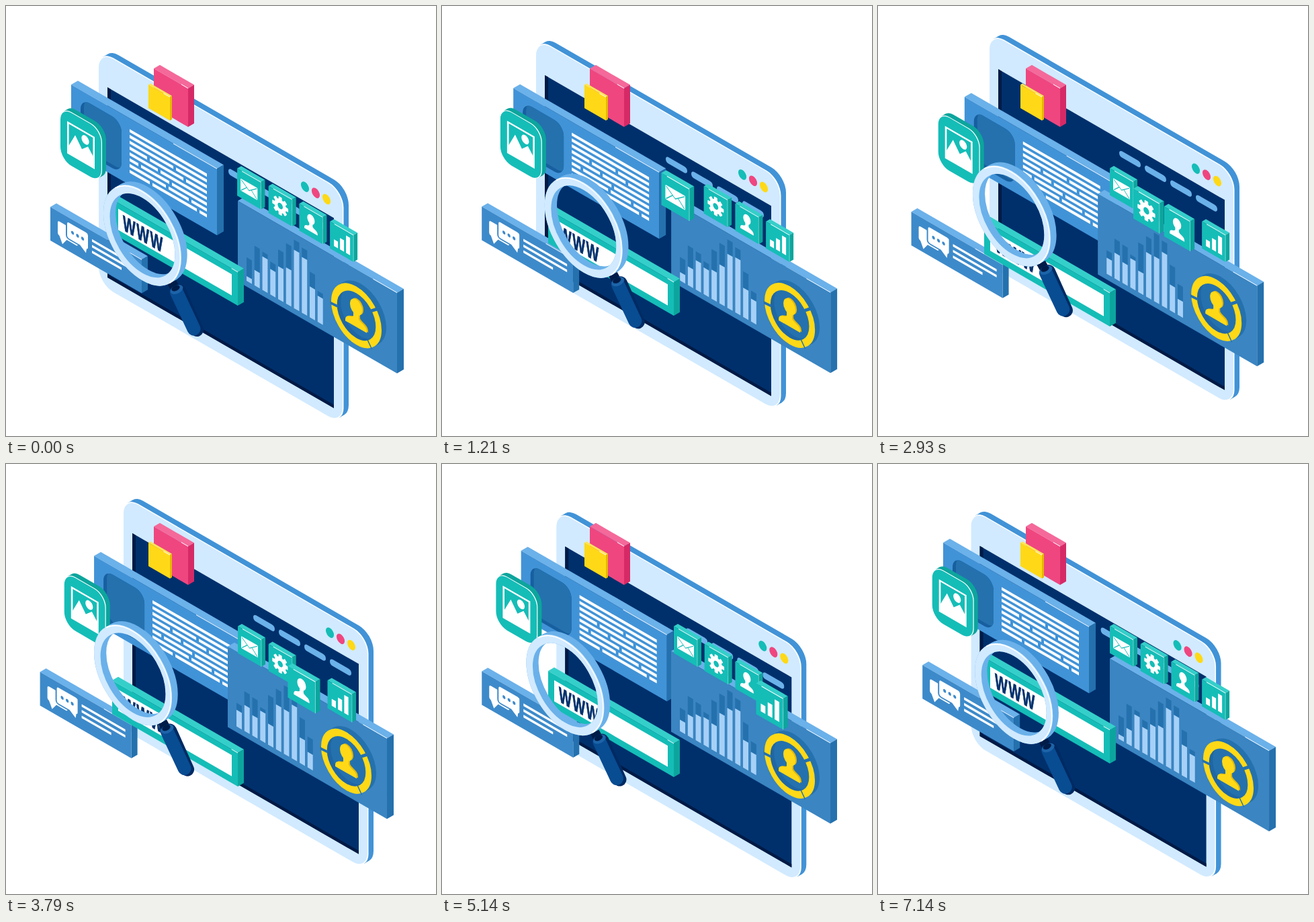
Animation, 640 px wide and 640 px high, one loop 7.21 s. Source, as an HTML page:

```html
<!DOCTYPE html>
<html lang="en">
<head>
<meta charset="utf-8">
<title>Isometric dashboard</title>
<style>
html, body { margin: 0; width: 100%; height: 100%; overflow: hidden; background: #fff; }
svg { display: block; width: 100%; height: 100%; }
</style>
</head>
<body>
<svg id="stage" viewBox="0 0 640 640"></svg>
<script>
const LOOP = 7210;
const SLOPE = 0.5774;
const NAVY = '#00306c', PALE = '#d1eaff', SKY = '#6bb1ea', BLUE = '#4193d7',
      STEEL = '#3a85c2', DEEP = '#2471ae', TEAL = '#15bdb7', MINT = '#35cfca',
      PINE = '#0ca59d', PINK = '#ef4680', YELLOW = '#ffd917';

// ---- markup helpers: inside a plane, x is screen x and y runs down ----
const poly = (pts, fill) => `<polygon points="${pts.join(' ')}" fill="${fill}"/>`;
const rect = (x, y, w, h, fill, r = 0, more = '') =>
  `<rect x="${x}" y="${y}" width="${w}" height="${h}" rx="${r * 0.866}" ry="${r}" fill="${fill}" ${more}/>`;
const oval = (x, y, r, fill) =>
  `<ellipse cx="${x}" cy="${y}" rx="${r * 0.866}" ry="${r}" fill="${fill}"/>`;
const line = (d, color, width, more = '') =>
  `<path d="${d}" fill="none" stroke="${color}" stroke-width="${width}" ${more}/>`;
const plane = (x, y, body) => `<g transform="matrix(1 ${SLOPE} 0 1 ${x} ${y})">${body}</g>`;
const part = (id, body) => `<g id="${id}">${body}</g>`;

// Square-edged block with a lit top, a shaded side and a bright front edge
function box(x, y, w, h, d, [front, top, side], body = '', edge = 0.3) {
  const e = -2 * SLOPE * d;
  return plane(x, y,
    poly([0, 0, d, e, w + d, e, w, 0], top) +
    poly([w, 0, w + d, e, w + d, h + e, w, h], side) +
    rect(0, 0, w, h, front) +
    line(`M${w * (1 - edge)} 0H${w}`, '#fff', 1) + body);
}

// Rounded block: the two outlines joined along their tangents
function slab(x, y, w, h, r, d, front, side, rim, body) {
  const e = -2 * SLOPE * d, q = r * (1 - Math.SQRT1_2), p = q * 0.866;
  return plane(x, y,
    rect(d, e, w, h, side, r) +
    poly([p, q, p + d, q + e, w - p + d, h - q + e, w - p, h - q], side) +
    rect(0, 0, w, h, '#fff', r) +
    rect(0, rim, w - rim, h - rim, front, r) + body);
}

// Head and shoulders around 0,0
const person = (x, y, s, fill) =>
  `<g transform="translate(${x} ${y}) scale(${s})" fill="${fill}">
    <ellipse cx="0" cy="-12.5" rx="9" ry="11.5"/>
    <path d="M-4-4H4V3Q5 5 10 7Q16 9 16 15V17H-16V15Q-16 9-10 7Q-5 5-4 3Z"/></g>`;

// ---- parts ----
function tablet() {
  const recess = poly([13, 48.7, 18, 48.7, 18, 326.7, 350, 326.7, 350, 331.7, 13, 331.7], '#001a45');
  const pills = [0, 1, 2, 3].map(i => rect(193 + 38 * i, 64.5, 32, 9.6, SKY, 5)).join('');
  const dots = [TEAL, PINK, YELLOW].map((c, i) => oval(307 + 16 * i, 27, 7, c)).join('');
  return slab(138, 64.8, 364.5, 348.4, 25, 7.5, PALE, BLUE, 1.6,
    rect(13, 48.7, 337, 283, NAVY) + recess + pills + dots);
}

function article() {
  const rows = [[115], [115], [65, 46], [26, 50, 31], [42, 69], [13, 42, 52], [54, 30, 23], [30, 66, 11]];
  const text = rows.map((row, i) =>
    `M87 ${18.2 + 8.65 * i}` + row.map(n => `h${n}m4 0`).join('')).join('');
  return box(97, 117, 217, 99, 10, [BLUE, SKY, DEEP],
    `<clipPath id="well">${rect(14, 12, 61, 77, '#000', 16)}</clipPath>` +
    rect(14, 12, 61, 77, '#175f9f', 16) +
    `<g clip-path="url(#well)">${rect(19, 6.5, 61, 77, DEEP, 16)}</g>` +
    line(text, '#fff', 4.6));
}

function picture() {
  return slab(81, 148.5, 62, 80, 19, 6, TEAL, PINE, 1.2,
    `<g transform="translate(10 17)">` +
    line('M1.3 1.3H39.7V46.7H1.3Z', '#fff', 2.6) +
    poly([2, 46, 2, 36, 12, 14, 22, 29, 31, 20, 40, 32, 40, 46], '#fff') +
    oval(27, 12.5, 6.5, '#fff') + '</g>');
}

function chat() {
  const face = '#3d8aca';
  return box(66, 299, 136, 50, 9, [face, SKY, DEEP],
    rect(11, 14, 30, 21, '#fff', 3) + poly([13, 34, 25, 34, 18, 45], '#fff') +
    `<g stroke="${face}" stroke-width="4" paint-order="stroke">` +
    `<path d="M28 7.5H53Q56 7.5 56 10.5V28Q56 31 54 31L53 38L44 31H28Q25 31 25 28V10.5Q25 7.5 28 7.5Z" fill="#fff"/></g>` +
    [33, 40.5, 48].map(u => oval(u, 19.5, 2.5, face)).join('') +
    line('M62 14H127M62 22.5H127M62 31H106', '#fff', 3.8));
}

function search() {
  return box(158, 288, 187, 50, 9, [TEAL, MINT, PINE],
    rect(9, 8.5, 169, 31.5, '#fff') +
    `<text transform="translate(16 36) scale(.62 1)" font-family="'Liberation Sans', Arial, sans-serif"
      font-weight="700" font-size="32" letter-spacing="2.4" fill="${NAVY}" stroke="${NAVY}" stroke-width=".8">WWW</text>`,
    0.05);
}

const tall = [35, 59, 57, 49, 74, 90, 102, 97, 68, 46];
const low = [7, 23, 50, 38, 49, 54, 87, 83, 46, 39];
const high = [25, 39, 30, 44, 31, 67, 66, 80, 38, 23];
const BASE = 111.5;

function chart() {
  const bars = tall.map((h, i) => {
    const u = 13 + 11.75 * i;
    return rect(u, BASE - h, 8, h, DEEP) + rect(u, BASE, 8, 0, '#a6d0f7', 0, 'class="bar"');
  }).join('');
  const spoke = deg => {
    const a = deg * Math.PI / 180, c = Math.cos(a), s = Math.sin(a);
    return `M${32 * c} ${32 * s}L${45 * c} ${45 * s}`;
  };
  const donut = `<g transform="translate(176.5 69)">` +
    oval(7, -8, 43.3, DEEP) + poly([-26.5, -30.6, -19.5, -38.7, 33.5, 22.5, 26.5, 30.6], DEEP) +
    oval(0, 0, 43, '#1f66a4') +
    `<clipPath id="hole">${oval(0, 0, 34, '#000')}</clipPath>` +
    `<g clip-path="url(#hole)">${oval(6, -7, 34, DEEP)}</g>` +
    `<g transform="scale(.866 1)"><circle r="38.3" fill="none" stroke="${YELLOW}" stroke-width="10"/>` +
    line([176, -38].map(spoke).join(''), DEEP, 4) + line(spoke(54), DEEP, 2) + '</g>' +
    person(1.5, -2, 1, '#e2b808') + person(-0.5, 0, 1, YELLOW) + '</g>';
  return box(345, 290, 237, 120, 10, [STEEL, SKY, DEEP], bars + donut, 0.15);
}

function gear() {
  const teeth = [...Array(8).keys()].map(i =>
    `<rect x="-2.8" y="-13.5" width="5.6" height="7" rx="1" transform="rotate(${i * 45})"/>`).join('');
  return `<g transform="translate(17.5 19.6) scale(.88 1)" fill="#fff">${teeth}
    <circle r="7.2" fill="none" stroke="#fff" stroke-width="5.6"/></g>`;
}

const glyphs = [
  rect(5, 11.5, 25, 18, '#fff', 1.5) +
    line('M6 13L17.5 22.5L29 13M6 28.5L14 20M29 28.5L21 20', TEAL, 1),
  gear(),
  person(17.5, 21, 0.62, '#fff'),
  [10, 17, 26].map((h, i) => rect(6 + 9 * i, 33 - h, 6, h, '#fff')).join('')
];
const iconPos = i => [345 + 45.7 * i, 241.5 + 26.4 * i];
const icon = i => part('icon' + i, box(...iconPos(i), 35, 40, 6, [TEAL, MINT, PINE],
  glyphs[i] + line('M35 0V40', '#8fe3df', 0.6), 0.8));

function magnifier() {
  const hoop = (k, color) =>
    `<circle cx="${k}" cy="${-k}" r="61.5" fill="none" stroke="${color}" stroke-width="11"/>`;
  const depth = [...Array(11).keys()].map(k => hoop(10 - k, SKY)).join('');
  return line('M244 406L256 428', '#001c48', 14) +
    line('M258 424L284 482', '#002a62', 20, 'stroke-linecap="round"') +
    line('M254 426L279.5 480.5', '#084c92', 20, 'stroke-linecap="round"') +
    `<ellipse cx="254" cy="422" rx="10" ry="6" fill="#1d63a8" transform="rotate(-26 254 422)"/>` +
    `<ellipse cx="252.5" cy="420" rx="6.5" ry="4" fill="#001c48" transform="rotate(-26 252.5 420)"/>` +
    `<g transform="matrix(.866 .5 0 1 203 341.5)">${depth}${hoop(0, PALE)}
      ${line('M-47-47A66.5 66.5 0 0 1 47 47', '#fff', 1.6)}</g>`;
}

const stage = document.getElementById('stage');
stage.innerHTML =
  part('tablet', tablet()) +
  box(220, 93, 51, 57.5, 9, [PINK, '#f4699a', '#d62a67'], '', 0.2) +
  box(212, 117, 32, 35, 3, [YELLOW, '#ffe558', '#e5b900'], '', 0.3) +
  part('article', article()) +
  part('picture', picture()) +
  part('chart', chart()) +
  part('chat', chat()) +
  part('search', search()) +
  glyphs.map((_, i) => icon(i)).join('') +
  part('magnifier', magnifier());

// ---- motion ----
const el = id => document.getElementById(id);
const bars = [...document.querySelectorAll('.bar')];
const move = (id, x, y) => el(id).setAttribute('transform', `translate(${x.toFixed(2)} ${y.toFixed(2)})`);

// Smooth periodic curve through [time, value] keys
function track(keys, t) {
  const n = keys.length;
  const at = i => {
    const turn = Math.floor(i / n), [k, v] = keys[i - turn * n];
    return [k + turn * LOOP, v];
  };
  const slope = i => (at(i + 1)[1] - at(i - 1)[1]) / (at(i + 1)[0] - at(i - 1)[0]);
  let i = n - 1;
  while (keys[i][0] > t) i--;
  const [t0, a] = at(i), [t1, b] = at(i + 1), d = t1 - t0, s = (t - t0) / d;
  const ease = s * s * (3 - 2 * s);
  return a + (b - a) * ease + d * s * (1 - s) * (slope(i) * (1 - s) - slope(i + 1) * s);
}

const tabletX = [[0, 0], [1210, 2], [2930, 28], [3790, 37], [5140, 32.3], [5930, 20]];
const searchY = [[0, 0], [1210, 15], [2930, 31], [3790, 34], [5140, 20], [5930, 9]];
const chartX = [[0, 0], [790, -1.5], [1570, -6.5], [2360, -13.5], [2930, -17.8],
  [3790, -15], [4710, -6.5], [5500, -2.5], [6290, -0.5]];
const chartY = [[0, 0], [1210, -0.5], [2930, -10.5], [3790, -18.5], [5140, -11.5], [5930, -5]];

function draw(t) {
  const angle = t / LOOP * 2 * Math.PI, c = Math.cos(angle) - 1, s = Math.sin(angle);
  const wave = (a, b) => a * c + b * s;

  move('tablet', track(tabletX, t), wave(10.25, -14.8));
  const slide = wave(-17.2, 0.5);
  move('article', slide, slide * SLOPE);
  move('picture', wave(-3.3, 4.8), wave(-5, -3.6));
  move('chat', wave(8, -3.2), wave(-5, -3.4));
  move('magnifier', wave(6, 12.5), wave(14.2, -5.2));
  move('search', 0, track(searchY, t));
  move('chart', track(chartX, t), track(chartY, t));

  const mix = wave(-0.5, 0.06);
  bars.forEach((bar, i) => {
    const h = low[i] + (high[i] - low[i]) * mix;
    bar.setAttribute('y', BASE - h);
    bar.setAttribute('height', h);
  });

  // Icons step forward one after another
  glyphs.forEach((_, i) => {
    const gap = Math.min(1, Math.abs(t - 1130 - 1200 * i) / 1320);
    const p = (1 + Math.cos(Math.PI * gap)) / 2, k = 1 + 0.19 * p;
    const [x, y] = iconPos(i), cx = x + 20.5, cy = y + 28.5;
    el('icon' + i).setAttribute('transform',
      `translate(${cx - 14.8 * p} ${cy + 12.5 * p}) scale(${k}) translate(${-cx} ${-cy})`);
  });
}

const start = performance.now();
function tick() {
  draw((performance.now() - start) % LOOP);
  requestAnimationFrame(tick);
}
tick();
</script>
</body>
</html>
```
